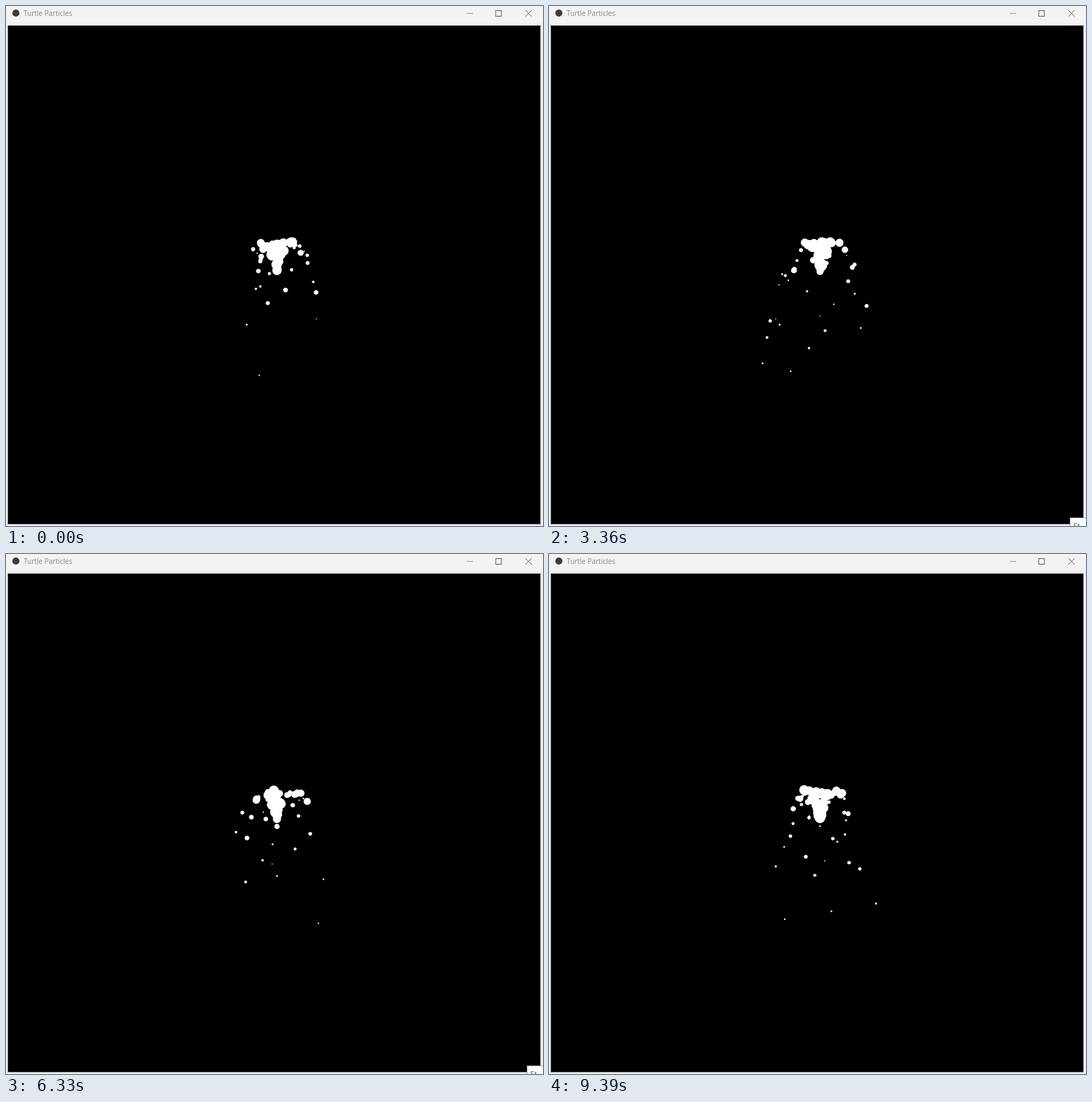
These frames come from a looping animation (761 by 736 pixels, 9410 ms). An HTML page with a canvas:

```html
<!DOCTYPE html>
<html lang="en">
<head>
<meta charset="utf-8">
<title>Turtle Particles</title>
<style>
  html, body { margin: 0; width: 100%; height: 100%; overflow: hidden; background: #f0f0f0; }
  canvas { display: block; }
</style>
</head>
<body>
<canvas id="stage" width="761" height="736"></canvas>
<script>
const ctx = document.getElementById('stage').getContext('2d');
const LOOP = 9410;
const FONT = '"Open Sans", "Noto Sans", sans-serif';
const HINT = { from: 1400, to: 9200 };

// The simulation runs for RUN ms, then rests until the next PERIOD.
const PERIOD = 990;
const RUN = 910;
const STEPS_PER_PERIOD = 30.7;

const SCALE = 0.893;
const ORIGIN = { x: 384, y: 381 };
const LIFT = 3;
const GRAVITY = 0.1;
const SHRINK = 0.1;
const MIN_SIZE = 4;
const MAX_SIZE = 10;
const MAX_AGE = MAX_SIZE / SHRINK;

function seeded(seed) {
  return () => {
    seed = (seed + 0x6D2B79F5) | 0;
    let v = Math.imul(seed ^ (seed >>> 15), 1 | seed);
    v = (v + Math.imul(v ^ (v >>> 7), 61 | v)) ^ v;
    return ((v ^ (v >>> 14)) >>> 0) / 4294967296;
  };
}

function stepAt(t) {
  const part = Math.min(1, (t % PERIOD) / RUN);
  return Math.floor(STEPS_PER_PERIOD * (Math.floor(t / PERIOD) + part));
}

// One particle is born at every step; some are already in flight at the start.
function makeParticles() {
  const random = seeded(41);
  const pick = (lo, hi) => lo + Math.floor(random() * (hi - lo + 1));
  const all = [];
  for (let birth = -MAX_AGE; birth <= stepAt(LOOP); birth++) {
    all.push({ birth, vx: pick(-10, 10) / 10, size: pick(MIN_SIZE, MAX_SIZE) });
  }
  return all;
}
const particles = makeParticles();

function box(x, y, w, h, color) {
  ctx.fillStyle = color;
  ctx.fillRect(x, y, w, h);
}

function line(color, x1, y1, x2, y2) {
  ctx.strokeStyle = color;
  ctx.beginPath();
  ctx.moveTo(x1, y1);
  ctx.lineTo(x2, y2);
  ctx.stroke();
}

function text(str, x, y, size, color) {
  ctx.font = `${size}px ${FONT}`;
  ctx.fillStyle = color;
  ctx.fillText(str, x, y);
}

function drawWindow() {
  box(0, 0, 761, 736, '#f0f0f0');
  box(0, 0, 761, 24, '#f3f3f3');
  box(2, 27, 756, 707, '#a0a0a0');
  box(3, 28, 754, 705, '#000');

  ctx.fillStyle = '#3a3d40';
  ctx.beginPath();
  ctx.arc(14, 10, 5, 0, Math.PI * 2);
  ctx.fill();
  text('Turtle Particles', 25, 14, 10, '#858585');

  line('#999', 653, 10.5, 662, 10.5);
  ctx.strokeStyle = '#5c5c5c';
  ctx.strokeRect(694, 6.5, 8, 8);
  line('#666', 736, 6, 745, 15);
  line('#666', 745, 6, 736, 15);
}

// Each circle stands on its particle's position.
function drawParticle(p, step) {
  const age = step - p.birth;
  const size = p.size - SHRINK * age;
  if (age < 0 || size <= 0) return;
  const r = size * SCALE + 0.5;
  const x = ORIGIN.x + SCALE * p.vx * age;
  const y = ORIGIN.y + SCALE * (GRAVITY / 2 * age * age - LIFT * age) - r;
  ctx.beginPath();
  for (let i = 0; i < 12; i++) {
    const a = (i + 0.5) * Math.PI / 6;
    ctx.lineTo(x + r * Math.cos(a), y + r * Math.sin(a));
  }
  ctx.fill();
}

function drawHint() {
  box(738, 724, 23, 12, '#a0a0a0');
  box(739, 725, 22, 11, '#fff');
  text('St', 743, 740, 10.5, '#575757');
}

function render(t) {
  drawWindow();
  const step = stepAt(t);
  ctx.fillStyle = '#fff';
  for (const p of particles) drawParticle(p, step);
  if (t >= HINT.from && t < HINT.to) drawHint();
}

const begin = performance.now();
function tick() {
  render((performance.now() - begin) % LOOP);
  requestAnimationFrame(tick);
}
tick();
</script>
</body>
</html>
```
